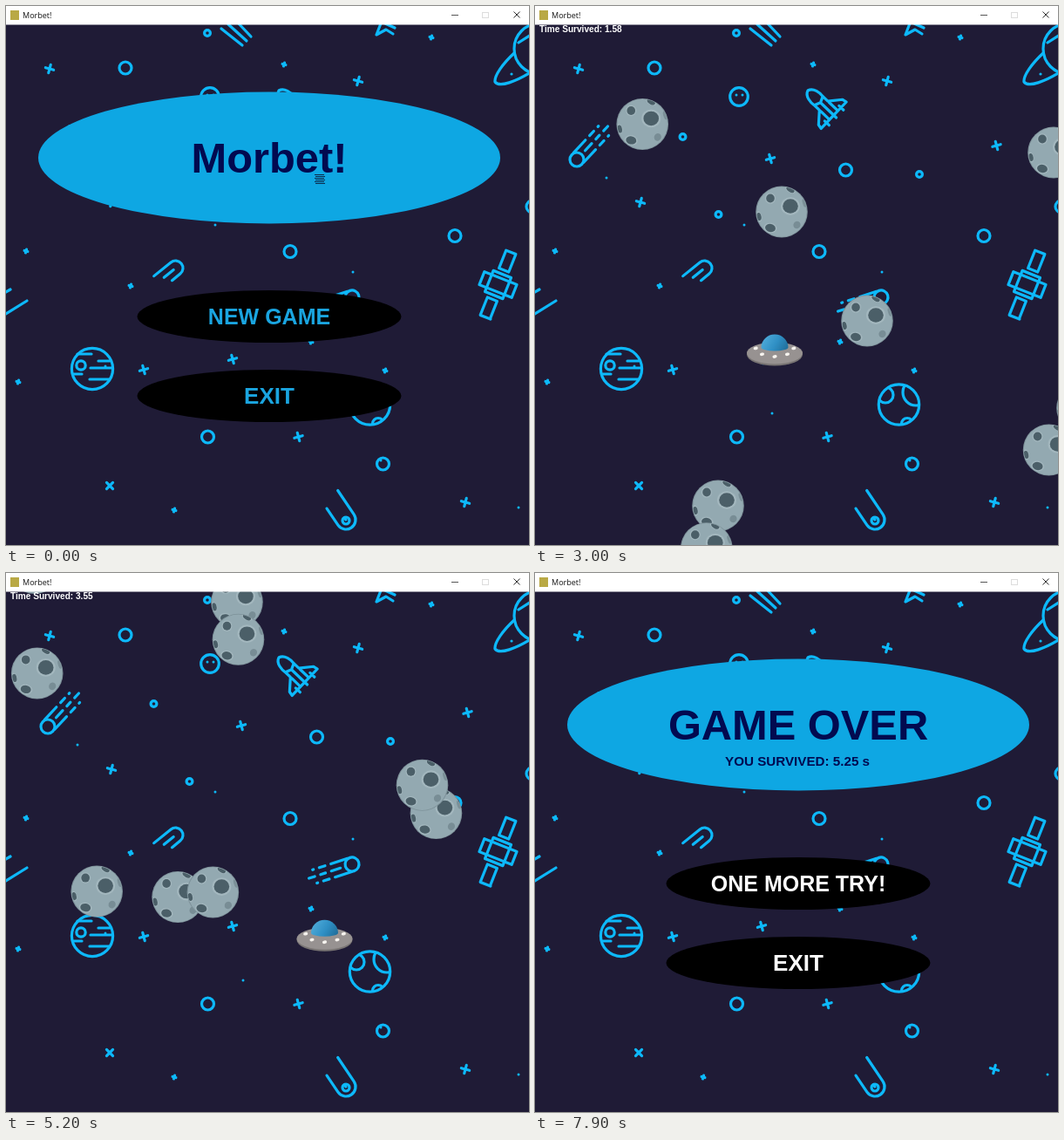
An HTML page with a canvas for the animation above (8 s loop, 600x618 px).

```html
<!DOCTYPE html>
<html lang="en">
<head>
<meta charset="utf-8">
<title>Morbet!</title>
<style>
html, body { margin: 0; width: 100%; height: 100%; overflow: hidden; background: #1f1b36; }
canvas { display: block; }
</style>
</head>
<body>
<canvas id="stage" width="600" height="618"></canvas>
<script>
const W = 600, H = 618, LOOP = 8000, STEP = 100;
const GAME_START = 1233, GAME_END = 7150;
const NAME = 'Morbet!';
const BOLD = '"Liberation Sans", Arial, sans-serif';
const LINE = '#0db9fb';
const screen = document.getElementById('stage').getContext('2d');
let g = screen;

function ellipse(x, y, rx, ry, fill, turn = 0) {
  g.beginPath();
  g.ellipse(x, y, rx, ry, turn, 0, 7);
  g.fillStyle = fill;
  g.fill();
}

function ring(x, y, r) {
  g.beginPath();
  g.arc(x, y, r, 0, 7);
  g.stroke();
}

function path(d) {
  g.stroke(new Path2D(d));
}

function text(str, x, y, size, fill, align = 'center', font = 'bold ' + size + 'px ' + BOLD) {
  g.font = font;
  g.textAlign = align;
  g.fillStyle = fill;
  g.fillText(str, x, y);
}

// Runs draw with the origin at x, y and the axes turned by some degrees.
function at(x, y, degrees, draw) {
  g.save();
  g.translate(x, y);
  g.rotate(degrees * Math.PI / 180);
  draw();
  g.restore();
}

// ---- Backdrop: line art on dark blue ----
const RINGS = [[137, 71], [356.5, 188], [326, 281.5], [515, 263.5], [231.5, 494], [432.5, 525], [604, 230]];
const SMALL_RINGS = [[231, 31], [169.5, 150], [210.5, 239], [441, 193]];
const CROSSES = [[270, 175], [50, 72], [529.5, 160], [404, 86], [158, 417], [121, 225], [260, 405], [527, 569], [335.5, 494]];
const SMALL_CROSSES = [[319, 67], [488, 36], [23, 281], [143, 321], [14, 431], [350, 385], [435, 418], [193, 578]];

function cross(x, y, arm, degrees) {
  at(x, y, degrees, () => path(`M${-arm} 0H${arm}M0 ${-arm}V${arm}`));
}

// A half-round head whose tail runs along three rails of given lengths.
function openComet(x, y, r, degrees, left, middle, right) {
  at(x, y, degrees, () => path(`M${left} ${r}H0A${r} ${r} 0 0 1 0 ${-r}H${right}M3 0H${middle}`));
}

// A ring whose tail breaks up into dashes.
function dashedComet(x, y, degrees) {
  const r = 8;
  at(x, y, degrees, () => {
    ring(0, 0, r);
    g.setLineDash([20, 7, 7, 7]);
    path(`M3 ${-r}H45M3 ${r}H45`);
    g.setLineDash([11, 7, 6, 7]);
    path('M14 0H52');
  });
}

function shuttle() {
  const half = s => `M0 0C2 ${7 * s} 12 ${8 * s} 17 ${7 * s}L25 ${7 * s}L36 ${20 * s}L41 ${21 * s}V0` +
    `M17 ${7 * s}L20 0M27 ${7 * s}H41M38 ${12 * s}H45`;
  path(half(1) + half(-1) + 'M20 0H45');
}

function satellite() {
  for (const y of [-40, 18]) g.strokeRect(-6, y, 12, 22);
  g.strokeRect(-11, -13, 22, 26);
  g.strokeRect(-20, -8, 40, 16);
}

function paintBackdrop() {
  g.fillStyle = '#1f1b36';
  g.fillRect(0, 0, W, H);
  g.strokeStyle = LINE;
  g.lineWidth = 3.2;
  g.lineCap = g.lineJoin = 'round';

  RINGS.forEach(([x, y]) => ring(x, y, 7));
  SMALL_RINGS.forEach(([x, y]) => ring(x, y, 3.4));
  CROSSES.forEach(([x, y], i) => cross(x, y, 4.8, i % 2 ? 15 : -15));
  SMALL_CROSSES.forEach(([x, y]) => cross(x, y, 2, 17));
  cross(119, 550, 5, 45);
  for (let i = 0; i < 8; i++) ellipse((82 + i * 158) % W, 197 + i * 54, 1.5, 1.5, LINE);

  at(313, 97, 43.5, shuttle);
  at(564.5, 319.5, 21.7, satellite);
  dashedComet(48, 176, -47);
  dashedComet(397, 334, 162);
  openComet(390, 589, 11, -124, 33, 0, 23);
  ring(390, 590, 4);
  openComet(194.5, 300.5, 8.5, 141, 25, 17, 12);
  for (let i = 0; i < 3; i++) path(`M${247 + i * 8} ${26 - i * 5}l${24 - i * 3} 19`);
  path('M-2 329L5 325M-2 354L24 338');
  path('M430 20L425 33L436 27L444 32M435 20L446 25');

  // smiling planet
  ring(234, 104, 10.3);
  for (const x of [231, 238]) ellipse(x, 102, 1.5, 1.5, LINE);

  // striped planet
  ring(99, 416, 23.6);
  ring(86, 412, 5.2);
  path('M82 399H98M106 407H119M97 415H122M77 422H87M96 428H118');

  // ringed planet
  ring(612, 49, 29);
  path('M583 54C570 66 560 80 561 87C566 94 586 86 602 76M588 42L602 33');
  ellipse(580, 78, 1.6, 1.6, LINE);

  // cratered moon
  at(417.5, 457, 0, () => {
    ring(0, 0, 23.2);
    g.clip();
    ring(-15.5, -11, 9);
    ring(19.5, -14, 15);
    ring(9.5, 22, 6.5);
  });
}

function paintTitleBar() {
  g.fillStyle = '#fff';
  g.fillRect(0, 0, W, 21.5);
  g.fillStyle = '#b9a945';
  g.fillRect(5, 5, 10, 11);
  text(NAME, 19, 13.5, 9, '#111', 'left', '9px "Open Sans", sans-serif');
  g.lineWidth = 1;
  g.strokeStyle = '#555';
  path('M511 10.5H519');
  g.strokeStyle = '#ddd';
  g.strokeRect(546.5, 7.5, 7, 6);
  g.strokeStyle = '#333';
  path('M582.5 6.5L589.5 13.5M589.5 6.5L582.5 13.5');
}

// ---- Sprites ----
function crater(x, y, rx, ry, turn = 0) {
  ellipse(x, y, rx * 1.25, ry * 1.25, '#a3b7be', turn);
  ellipse(x, y, rx, ry, '#4b5f68', turn);
}

function paintRock(x, y) {
  at(x, y, 0, () => {
    ellipse(0, 0, 29.8, 29.5, '#7f939b');
    g.beginPath();
    g.arc(0, 0, 28.8, 0, 7);
    g.clip();
    ellipse(0, 0, 29, 29, '#93a9b1');
    crater(10, -6.5, 8.8, 8.3);
    crater(-13, -15.5, 4.8, 5);
    crater(10, -25.5, 5, 2.8, 0.5);
    crater(-26, 5.5, 2.6, 4.6, -0.2);
    crater(-13, 18.5, 6, 4.6, 0.2);
    ellipse(26, -10, 2, 5, '#7b9098', -0.3);
    ellipse(17.5, 15, 4, 4.4, '#788d95', 0.5);
  });
}

function paintSaucer(x, y) {
  at(x, y, 0, () => {
    ellipse(0, 1, 32, 13, '#787473');
    ellipse(0, -0.5, 32, 12.5, '#979291');
    const glass = g.createLinearGradient(-15, -18, 15, 0);
    glass.addColorStop(0, '#51addb');
    glass.addColorStop(0.5, '#2f8fc4');
    glass.addColorStop(1, '#1d6791');
    g.beginPath();
    g.ellipse(0, -7, 15.5, 15, 0, Math.PI, 0);
    g.ellipse(0, -7, 15.5, 4, 0, 0, Math.PI);
    g.fillStyle = glass;
    g.fill();
    // lamps on the front of the rim
    for (let i = -2; i <= 2; i++) {
      const a = i * 0.72;
      ellipse(22 * Math.sin(a), 11 * Math.cos(a) - 7.5, 2.6, 1.8, '#f7f4ef', -0.2);
    }
  });
}

// Rocks fly straight: time, x, y, heading in degrees and, if unusual, speed per second.
const ROCK_SPEED = 158;
const ROCKS = [
  [2000, 239, 91, 159, 124],
  [3000, 283, 236, 224],
  [3000, 381, 361, 250.5],
  [3000, 210, 573, 13.4],
  [2000, 92, 535, 39.6, 136],
  [2000, 302, 590, 79],
  [2000, 488, 630, -50],
  [2000, 628, 303, 90],
  [3000, 595, 168, -103],
  [5900, 460, 381, 107.6],
  [5900, 407, 158, -129.6],
  [5900, 278, 447, 43],
  [5900, 176, 281, -49.5],
  [5900, 294, 271, -59.2],
  [5900, 231, 181, 108.7],
  [5900, 115, 192, 44.2],
  [6600, 524, 627, -112]
];

// The saucer's turning points: time, x, y
const FLIGHT = [
  [1233, 318, 358],
  [2000, 328, 367],
  [3000, 275, 398.5],
  [4500, 323, 409.5],
  [5900, 408, 430],
  [6600, 344, 414.5],
  [7150, 292, 371]
];

function saucerAt(t) {
  const i = FLIGHT.findIndex(key => key[0] > t);
  const [t0, x0, y0] = FLIGHT[i - 1], [t1, x1, y1] = FLIGHT[i];
  const k = (t - t0) / (t1 - t0);
  return [x0 + (x1 - x0) * k, y0 + (y1 - y0) * k];
}

// ---- Scenes ----
function paintGame(t) {
  for (const [time, x, y, degrees, speed = ROCK_SPEED] of ROCKS) {
    const path = speed * (t - time) / 1000, a = degrees * Math.PI / 180;
    paintRock(x + path * Math.cos(a), y + path * Math.sin(a));
  }
  paintSaucer(...saucerAt(t));
  const survived = (t - GAME_START) * 0.000895;
  text('Time Survived: ' + survived.toFixed(2), 5, 30, 10.1, '#fff', 'left');
}

function paintMenu(title, button, color, note) {
  ellipse(302, 174, 265, 75.5, '#0ea7e3');
  text(title, 302, 191, 48.8, '#020a50');
  if (note) text(note, 301, 221, 15.2, '#020a50');
  for (const y of [356, 447]) ellipse(302, y, 151.5, 30, '#000');
  text(button, 302, 365, 25, color);
  text('EXIT', 302, 456, 26, color);
}

function paintPointer(t) {
  const k = Math.min(1, t / 1000);
  const x = 354 - 40 * k, y = 193 + 160 * k;
  g.fillStyle = '#0b2a4c';
  for (let i = 0; i < 6; i++) g.fillRect(x + i % 2, y + i * 2, 11, 1);
}

const backdrop = document.createElement('canvas');
backdrop.width = W;
backdrop.height = H;
g = backdrop.getContext('2d');
paintBackdrop();
g = screen;

const begin = performance.now();
function frame() {
  const now = Math.max(0, performance.now() - begin) % LOOP;
  const t = Math.floor(now / STEP) * STEP;
  g.drawImage(backdrop, 0, 0);
  if (t < GAME_START) {
    paintMenu(NAME, 'NEW GAME', '#1aa5e0');
    paintPointer(t);
  } else if (t < GAME_END) {
    paintGame(t);
  } else {
    paintMenu('GAME OVER', 'ONE MORE TRY!', '#fff', 'YOU SURVIVED: 5.25 s');
  }
  paintTitleBar();
  requestAnimationFrame(frame);
}
frame();
</script>
</body>
</html>
```
